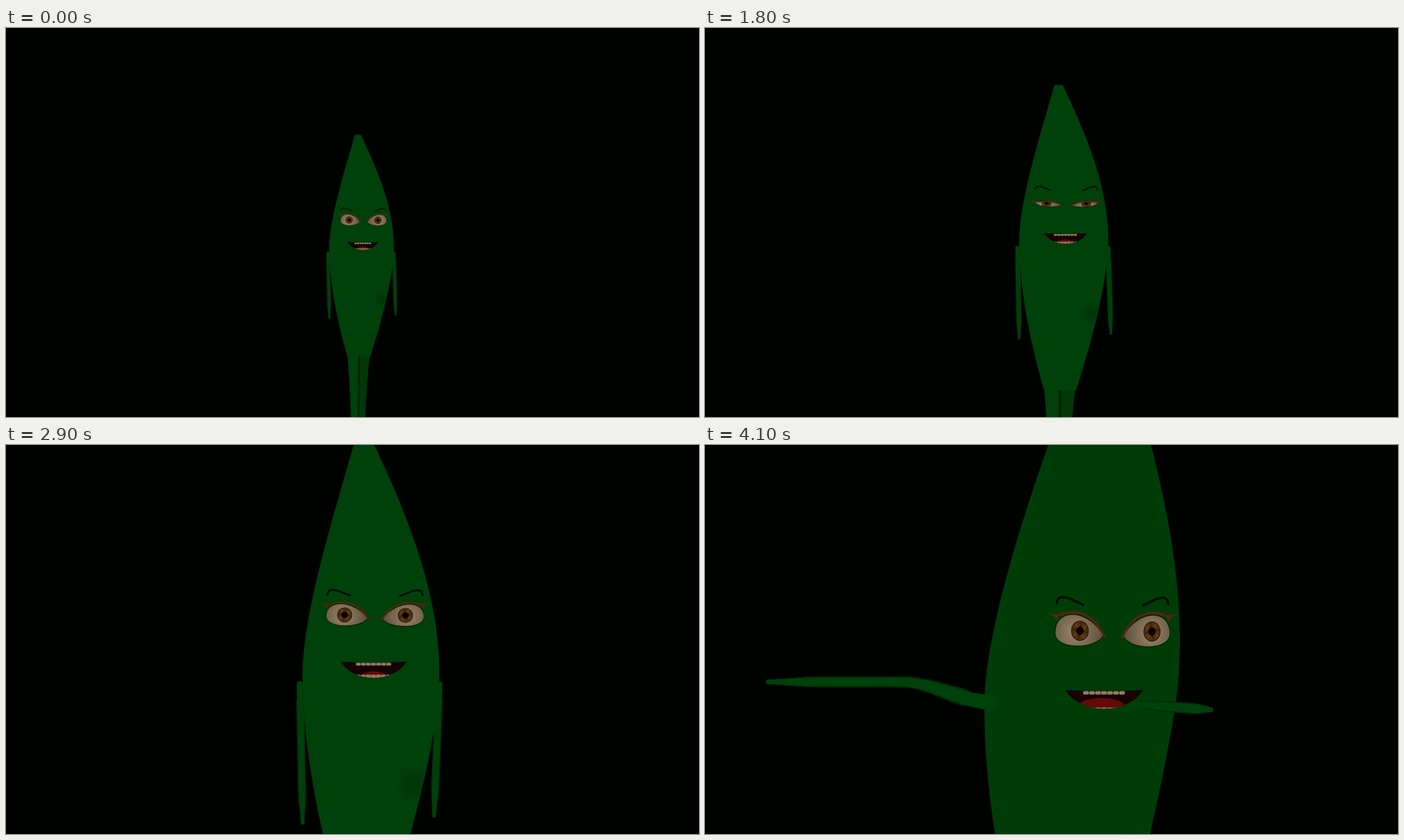
Animation of 960 by 540 pixels, one loop 4500 ms. Source, as an HTML page with a canvas:

```html
<!DOCTYPE html>
<html lang="en">
<head>
<meta charset="utf-8">
<title>Green walker</title>
<style>
html, body { margin: 0; width: 100%; height: 100%; overflow: hidden; background: #000200; }
canvas { display: block; }
</style>
</head>
<body>
<canvas id="stage" width="960" height="540"></canvas>
<script>
const ctx = document.getElementById('stage').getContext('2d');
const LOOP = 4500, STEP = 100, LAST = 41, HORIZON = 255;
const GREEN = '#00400a', SHADE = '#002c07', BROWN = '#502611', IVORY = '#8f7c62';

const mix = (a, b, t) => a + (b - a) * t;

function ease(t, from, to) {
  const u = Math.max(0, Math.min(1, (t - from) / (to - from)));
  return u * u * (3 - 2 * u);
}

// Rises from a to b, holds, falls from c to d
const pulse = (t, a, b, c, d) => ease(t, a, b) - ease(t, c, d);

function poseAt(step) {
  const bob = (22 + step / 4) * Math.cos((step - 1) * Math.PI / 6);
  const tilt = pulse(step, 10, 23, 33, 38);
  return {
    scale: 1 / mix(2.84, 1, ease(step, 0, 40)),
    drop: 101 - 25 * tilt + bob,
    open: 1 - .95 * pulse(step, 6, 12, 16, 32),
    lean: .03 - .07 * pulse(step, 23, 29, 33, 38),
    turn: ease(step, 38, 41)
  };
}

function placed(x, y, sx, sy, draw) {
  ctx.save();
  ctx.translate(x, y);
  ctx.scale(sx, sy);
  draw();
  ctx.restore();
}

function fillPath(color, trace) {
  ctx.fillStyle = color;
  ctx.beginPath();
  trace();
  ctx.fill();
}

function strokePath(color, width, trace) {
  ctx.strokeStyle = color;
  ctx.lineWidth = width;
  ctx.lineCap = ctx.lineJoin = 'round';
  ctx.beginPath();
  trace();
  ctx.stroke();
}

const disc = (x, y, r, color) => fillPath(color, () => ctx.arc(x, y, r, 0, Math.PI * 2));

function glow(x, y, r, inner, outer) {
  const g = ctx.createRadialGradient(x, y, 0, x, y, r);
  g.addColorStop(0, inner);
  g.addColorStop(1, outer);
  return g;
}

// Tapered limb along the x axis, bent and thickened at the root when raised
function drawArm(x, y, angle, length, root, bend) {
  const parts = 24;
  const point = u => [length * u, bend * ease(u, 0, .4)];
  ctx.save();
  ctx.translate(x, y);
  ctx.rotate(angle);
  for (const [color, part, first] of [[SHADE, 1, 3], [GREEN, .78, 0]]) {
    for (let i = first; i < parts; i++) {
      const u = i / parts;
      const radius = mix(root, 7.5, ease(u, 0, .4)) - 4 * ease(u, .75, 1);
      strokePath(color, radius * 2 * part, () => {
        ctx.moveTo(...point(u));
        ctx.lineTo(...point(u + 1 / parts));
      });
    }
  }
  ctx.restore();
}

function drawArms({ turn, lean }) {
  const down = Math.PI / 2;
  drawArm(mix(-137, -122, turn), mix(42, 17, turn), mix(down - .02, Math.PI, turn),
    mix(258, 309, turn), mix(7.5, 13, turn), 28 * turn);
  drawArm(mix(122, 74, turn), mix(42, 20, turn), mix(down - lean, .07, turn),
    mix(245, 108, turn), mix(7.5, 5, turn), 0);
}

function drawLegs() {
  for (const [outer, inner, foot, color] of [[-61, -16, -46, GREEN], [28, -16, 8, '#003808']]) {
    fillPath(color, () => {
      ctx.moveTo(outer, 440);
      ctx.quadraticCurveTo(mix(outer, foot, .7), 560, foot, 720);
      ctx.lineTo(-18, 720);
      ctx.lineTo(inner, 440);
    });
  }
  strokePath('#001803', 5, () => { ctx.moveTo(-16, 446); ctx.lineTo(-17, 720); });
}

function drawBody(turn) {
  const t = turn;
  fillPath(t > .5 ? '#003c08' : GREEN, () => {
    ctx.moveTo(-32 + 18 * t, -423);
    ctx.bezierCurveTo(-62 + 8 * t, -310, -132, -100, -132, 26);
    ctx.bezierCurveTo(-132, 150, -104, 300, -61, 449);
    ctx.lineTo(30, 449);
    ctx.bezierCurveTo(75, 310, 122 - 6 * t, 130, 122 + 11 * t, 20);
    ctx.bezierCurveTo(122 + 30 * t, -120, 70 + 53 * t, -260, -8 + 84 * t, -423);
  });
  disc(76, 228, 38, glow(76, 228, 38, 'rgba(0,20,3,.25)', 'rgba(0,20,3,0)'));
}

function drawIris(x) {
  disc(x, 0, 14, '#211008');
  disc(x, 0, 12.8, '#54300f');
  for (let i = 0; i < 8; i++) {
    const a = i * Math.PI / 4 + .2;
    strokePath(i % 2 ? '#694020' : '#38200f', 2, () => {
      ctx.moveTo(x + Math.cos(a) * 6, Math.sin(a) * 6);
      ctx.lineTo(x + Math.cos(a) * 11, Math.sin(a) * 11);
    });
  }
  disc(x, 0, 6, '#080302');
}

// Left eye around its centre, nose to the right
function drawEye(open, gaze) {
  const top = mix(-4, -31, open), low = mix(12, 26, open), wing = mix(-11, -30, open);
  const corner = mix(-5, 3, open);
  ctx.save();
  ctx.beginPath();
  ctx.moveTo(-34, corner);
  ctx.bezierCurveTo(-34, top, 16, top, 42, 6);
  ctx.bezierCurveTo(30, low, -34, low, -34, corner);
  ctx.strokeStyle = '#002306';
  ctx.lineWidth = 3;
  ctx.stroke();
  ctx.clip();
  ctx.fillStyle = glow(-3, 2, 46, '#9a866d', '#5c4d38');
  ctx.fillRect(-60, -40, 120, 80);
  drawIris(gaze);
  ctx.restore();

  strokePath(BROWN, 3.5, () => {
    ctx.moveTo(-34, wing + 11);
    ctx.bezierCurveTo(-14, top + 2, 22, top - 2, 44, 8);
  });
  fillPath(BROWN, () => {
    ctx.moveTo(-52, wing);
    ctx.quadraticCurveTo(-42, wing + 8, -27, wing + 7);
    ctx.lineTo(-32, wing + 16);
    ctx.quadraticCurveTo(-38, wing + 8, -52, wing);
  });
  strokePath('#000d02', 3.4, () => {
    ctx.moveTo(-32, -38);
    ctx.bezierCurveTo(-30, -50, -20, -47, -12, -45);
    ctx.lineTo(10, -36);
  });
}

function drawMouth(turn) {
  ctx.save();
  fillPath('#170304', () => {
    ctx.moveTo(-61, 0);
    ctx.quadraticCurveTo(0, 4, 61, 0);
    ctx.bezierCurveTo(38, 40, -38, 40, -61, 0);
  });
  ctx.clip();
  fillPath('#640a07', () => ctx.ellipse(-4 * turn, 26, mix(22, 36, turn), mix(8, 13, turn), 0, 0, Math.PI * 2));
  for (let x = -33; x < 30; x += 9.4) {
    fillPath(IVORY, () => {
      ctx.roundRect(x, 2, 9, 5.5, 2);
      ctx.roundRect(x, 24 + turn * 4, 9, 8, 2);
    });
  }
  ctx.restore();
}

function drawFace({ open, turn }) {
  const gaze = 5 * turn;
  placed(mix(-54, -4, turn), mix(-87, -82, turn), mix(1, .87, turn), 1, () => drawEye(open, gaze));
  placed(mix(59, 96, turn), mix(-86, -81, turn), mix(-1, -.84, turn), 1, () => drawEye(open, -gaze));
  placed(34 * turn, 0, mix(1, .885, turn), mix(1, .87, turn), () => drawMouth(turn));
}

function render(step) {
  const pose = poseAt(step), { scale, drop, turn } = pose;
  ctx.fillStyle = '#000200';
  ctx.fillRect(0, 0, 960, 540);
  placed(481 + 38 * scale, HORIZON + scale * drop, scale, scale, () => {
    if (!turn) drawArms(pose);
    drawLegs();
    drawBody(turn);
    drawFace(pose);
    if (turn) drawArms(pose);
  });
}

let start;
function tick(now) {
  start ??= now;
  render(Math.min(LAST, Math.floor((now - start) % LOOP / STEP)));
  requestAnimationFrame(tick);
}
render(0);
requestAnimationFrame(tick);
</script>
</body>
</html>
```
